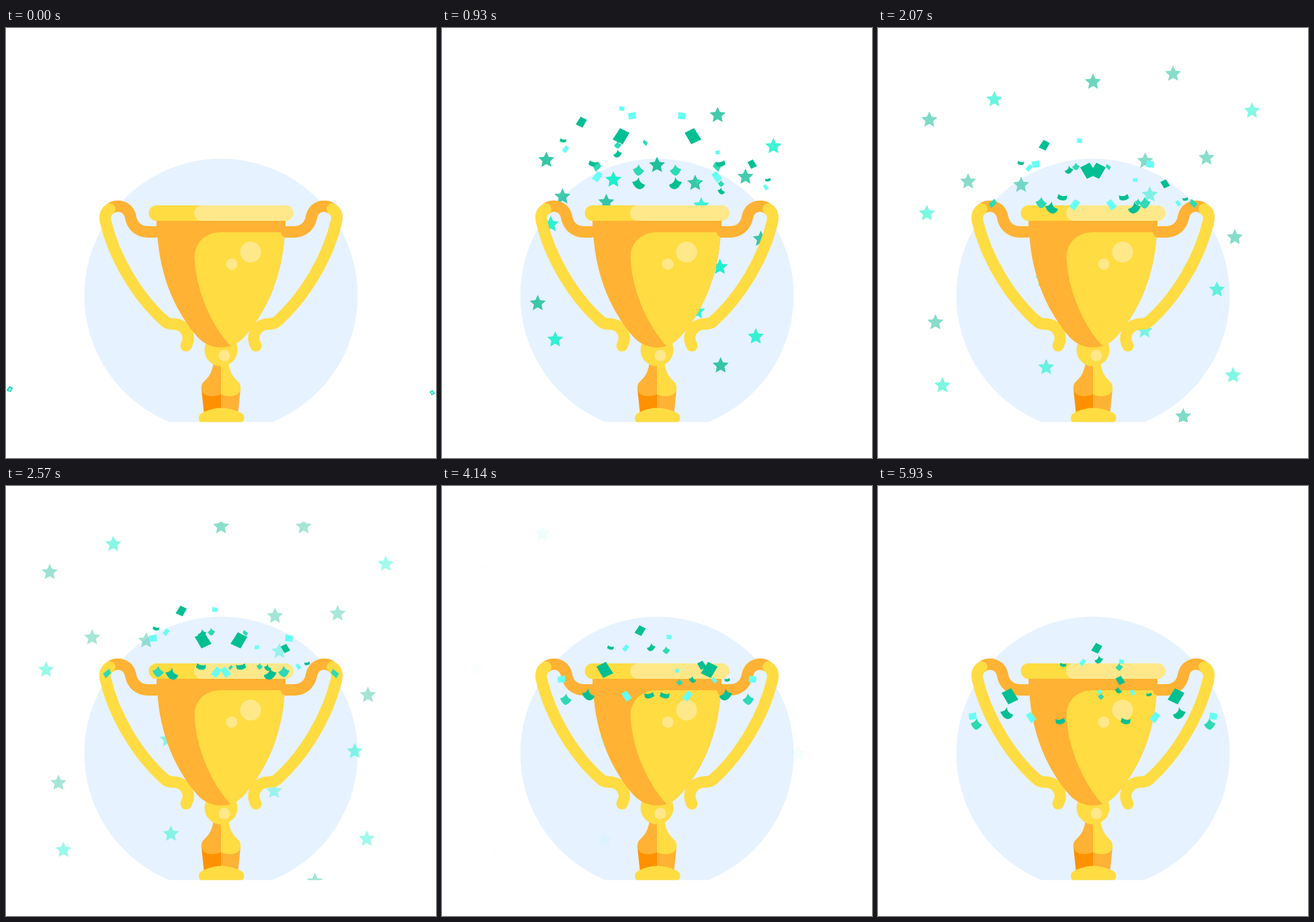
Animation of 640 by 640 pixels, one loop 6 s. Source, as an HTML page with a canvas:

```html
<!DOCTYPE html>
<html>
<head>
<meta charset="utf-8">
<style>
html, body { margin: 0; width: 100%; height: 100%; overflow: hidden; background: #fff; }
canvas { display: block; }
</style>
</head>
<body>
<canvas id="stage" width="640" height="640"></canvas>
<script>
const ctx = document.getElementById('stage').getContext('2d');
const LOOP = 6000, BURST = 800;
const YELLOW = '#ffdc42', LIGHT = '#ffe88a', ORANGE = '#ffb233', DARK = '#ff9100';
const GREEN = '#00bf93', TEAL = '#2ed9b5', CYAN = '#66fff5';
const STAR_TEAL = '#00b88f', STAR_CYAN = '#00f0c8';

// Star flights from the middle of the stage: dx, dy, start time
const tealStars = [
  [0, -276, 420], [125, -265, -175], [-262, -198, 50], [176, -133, -250], [82, -130, -100],
  [-195, -97, -175], [-114, -93, -25], [223, -10, -100], [-246, 123, -175], [143, 274, -25]
];
const cyanStars = [
  [250, -209, -100], [-171, -250, 484], [-269, -49, 135], [88, -76, -250], [210, 78, 386],
  [-241, 227, 50], [222, 209, -25], [80, 135, -250], [-78, 206, 300], [-83, 59, 300]
];

// Confetti: colour, shape, top of the throw, end of the fall, time of vanishing
const pieces = [
  [GREEN, 'M-2-12L12-5L2 12L-13 5Z', 304, -598, 481, -446],
  [GREEN, 'M-6-5Q0 0 7-3L6 3Q-1 7-8 1Z', 263, -557, 406, -409],
  [TEAL, 'M-3-7L6 0L2 7L-6-1Z', 446, -552, 624, -392, 2900],
  [TEAL, 'M-1-9Q2-3 8-2Q5 6 0 8Q-6 6-9 0Q-3-2-1-9Z', 385, -547, 531, -404],
  [GREEN, 'M0-9Q3-2 10-2Q6 8-1 9Q-8 8-9 2Q0 0 0-9Z', 384, -528, 485, -421],
  [CYAN, 'M1-8L8-3L0 9L-8 3Z', 268, -538, 449, -415],
  [CYAN, 'M-5-5L6-3L5 6L-6 5Z', 394, -629, 536, -417]
].map(([color, d, ...rest]) => [color, new Path2D(d), ...rest]);

// Cannons: x, y, horizontal scale, vertical scale
const cannons = [
  [5, 539, .667, .667], [635, 544, -.571, .571],
  [-37, 759, 1, 1], [677, 759, -1, 1]
];

const starShape = new Path2D();
for (let i = 0; i < 10; i++) {
  const r = i % 2 ? 6 : 12.6, a = i * Math.PI / 5;
  starShape.lineTo(r * Math.sin(a), -r * Math.cos(a));
}
starShape.closePath();

function fill(color, d) {
  ctx.fillStyle = color;
  ctx.fill(new Path2D(d));
}

function stroke(color, d) {
  ctx.strokeStyle = color;
  ctx.stroke(new Path2D(d));
}

function disc(color, x, y, r) {
  ctx.fillStyle = color;
  ctx.beginPath();
  ctx.arc(x, y, r, 0, 7);
  ctx.fill();
}

function pill(color, x, y, w, h) {
  ctx.fillStyle = color;
  ctx.beginPath();
  ctx.roundRect(x, y, w, h, h / 2);
  ctx.fill();
}

function bothSides(draw) {
  draw(0);
  ctx.save();
  ctx.translate(640, 0);
  ctx.scale(-1, 1);
  draw(1);
  ctx.restore();
}

function drawStars(list, color, t) {
  ctx.fillStyle = color;
  for (const [dx, dy, start] of list) {
    const age = t - start;
    const alpha = 1 - age / (4150 - start / 2);
    if (age < 0 || alpha <= 0) continue;
    const k = 1 - (1 - age / 4900) ** 5;
    ctx.save();
    ctx.globalAlpha = Math.min(1, alpha);
    ctx.translate(320 + dx * k, 321 + dy * k);
    ctx.fill(starShape);
    ctx.restore();
  }
}

function drawTrophy() {
  ctx.lineWidth = 17;
  ctx.lineCap = 'round';
  bothSides(() => {
    stroke(ORANGE, 'M154.5 269.5C165 261 183 265 185.5 282C188 294 197 303.5 212 303.5H223');
    stroke(YELLOW, 'M154.5 269.5C149 273 146.5 279 148 287C160 340 195 400 237 437Q241 440.5 249 440.5C266 440.5 277 457 268 473');
  });

  bothSides(right => {
    fill(right ? ORANGE : DARK, 'M291 538L320 543V577H295Z');
    fill(right ? YELLOW : ORANGE, 'M320 496H309C307 515 300 521 293 528Q290 532 291 540Q296 548 306 548Q315 548 320 545Z');
  });
  fill(YELLOW, 'M287 580Q287 574 296 571Q320 560 346 571Q354.5 574 354.5 580Q354.5 586 350 587H291Q287 586 287 580Z');
  disc(YELLOW, 320, 479, 24.5);
  disc(LIGHT, 325, 487.5, 8.5);

  fill(ORANGE, 'M224 286H416V304H415C411 375 385 425 355 459Q340 475.5 320 475.5Q300 475.5 285 460C255 425 229 375 225 304H224Z');
  fill(YELLOW, 'M280.5 341C281 319 297 304 320 304H415C411 375 385 425 355 459Q345 471 334 473C308 445 283 395 280.5 341Z');
  stroke(ORANGE, 'M417.5 303.5H428');
  disc(LIGHT, 364, 333.5, 15.5);
  disc(LIGHT, 336, 351.5, 8.5);
  pill(YELLOW, 212.5, 264, 215, 23);
  pill(LIGHT, 280, 264, 147.5, 23);
}

function drawConfetti(t) {
  const rise = 1 - (1 - Math.min(t / BURST, 1)) ** 3;
  const fall = (Math.max(t, BURST) ** .42 - 17.66) / 20.77;
  const size = .55 + .45 * rise;
  for (const [x, y, sx, sy] of cannons) {
    for (const [color, shape, x0, y0, x1, y1, end = LOOP] of pieces) {
      if (t > end) continue;
      ctx.save();
      ctx.translate(x, y);
      ctx.scale(sx, sy);
      ctx.translate(rise * (x0 + (x1 - x0) * fall), rise * (y0 + (y1 - y0) * fall));
      ctx.scale(size, size);
      ctx.fillStyle = color;
      ctx.fill(shape);
      ctx.restore();
    }
  }
}

function frame(now) {
  const t = now % LOOP;
  ctx.clearRect(0, 0, 640, 640);
  ctx.save();
  ctx.beginPath();
  ctx.rect(0, 53.5, 640, 533);
  ctx.clip();
  disc('#e6f2ff', 320, 398, 203.4);
  drawStars(tealStars, STAR_TEAL, t);
  drawStars(cyanStars, STAR_CYAN, t);
  drawTrophy();
  drawConfetti(t);
  ctx.restore();
}

const begin = performance.now();
function tick() {
  frame(performance.now() - begin);
  requestAnimationFrame(tick);
}
tick();
</script>
</body>
</html>
```
